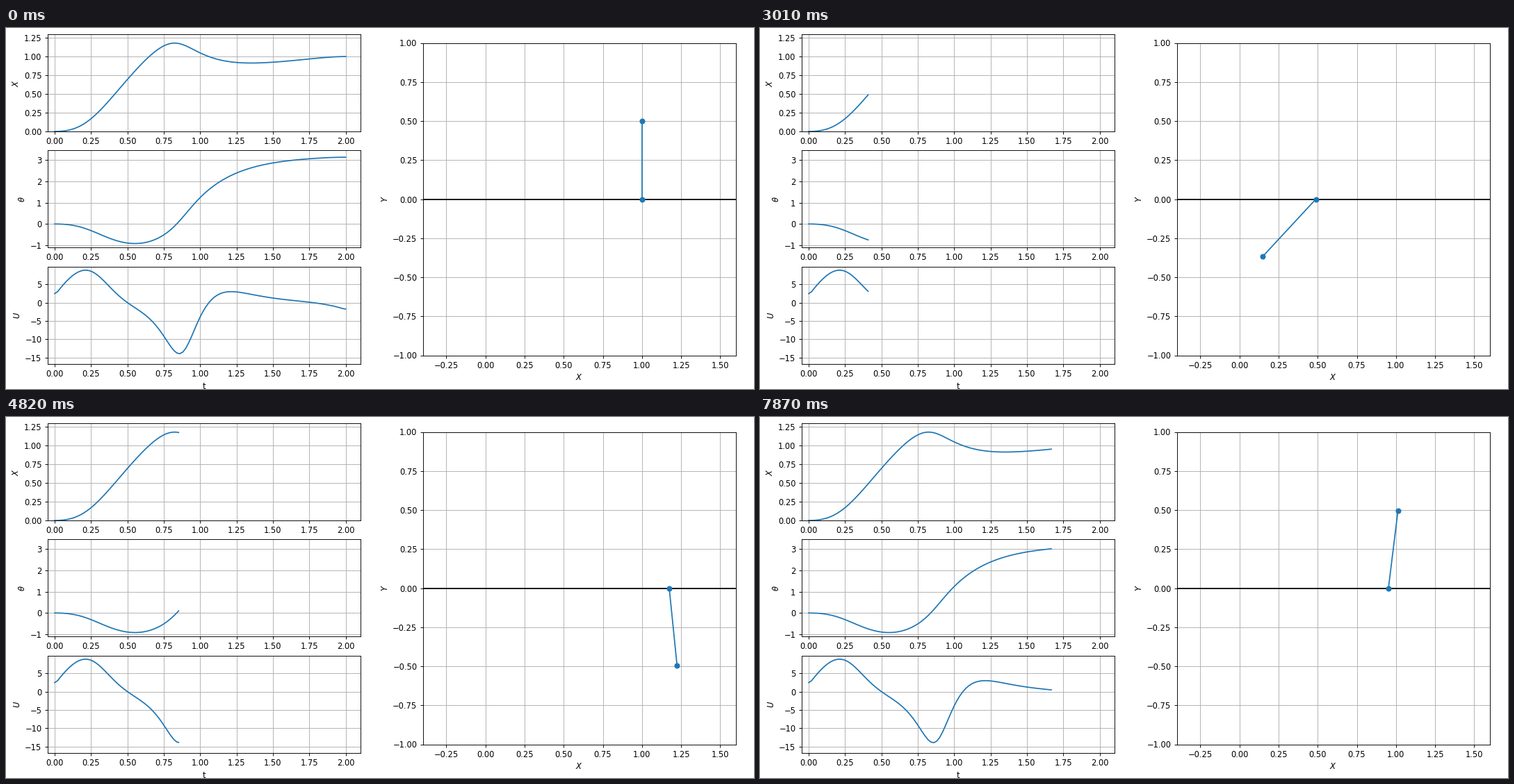
These frames come from a looping animation (1076 by 520 pixels, 7.99 s). A matplotlib script:

```python
import numpy as np
import matplotlib.pyplot as plt
from matplotlib.animation import FuncAnimation

W, H, DPI = 1076, 520, 80
FRAMES, INTERVAL = 170, 47
M1, M2, L, G = 1.0, 0.3, 0.5, 9.81   # cart, bob, rod, gravity
T, N = 2.0, 100
GOAL = np.array([1, np.pi, 0, 0])
BLUE = "#1f77b4"


def dynamics(z):
    """Rates of (x, angle, speed, spin) for rows (x, angle, speed, spin, force)."""
    _, q, v, w, u = z.T
    s, c = np.sin(q), np.cos(q)
    d = M1 + M2 * s * s
    acc = (L * M2 * s * w**2 + u + M2 * G * c * s) / d
    spin = -(L * M2 * c * s * w**2 + u * c + (M1 + M2) * G * s) / (L * d)
    return np.stack([v, w, acc, spin], axis=1)


def jacobian(z):
    jac = np.empty((len(z), 4, 5))
    for j in range(5):
        zc = z.astype(complex)
        zc[:, j] += 1e-20j
        jac[:, :, j] = dynamics(zc).imag / 1e-20
    return jac


def curvature(z, mult, eps=1e-5):
    """Second derivatives of mult . dynamics at every node."""
    hess = np.empty((len(z), 5, 5))
    for j in range(5):
        step = np.zeros(5)
        step[j] = eps
        diff = jacobian(z + step) - jacobian(z - step)
        hess[:, :, j] = np.einsum("ni,nij->nj", mult, diff) / (2 * eps)
    return (hess + hess.transpose(0, 2, 1)) / 2


def first_guess(t):
    tk = np.linspace(0, T, 17)
    x = np.array([0, .03, .17, .42, .69, .97, 1.14, 1.17, 1.05, .965,
                  .925, .915, .925, .945, .965, .99, 1])
    q = np.array([0, -.05, -.3, -.64, -.88, -.88, -.52, .28, 1.22, 1.92,
                  2.38, 2.68, 2.86, 2.99, 3.07, 3.12, 3.14])
    u = np.array([1.85, 7.4, 8.6, 4.9, .2, -3.3, -8.9, -13.7, -4.2, 1.7,
                  3, 2.2, 1.4, .8, .3, -.6, -1.85])
    rows = x, q, np.gradient(x, tk), np.gradient(q, tk), u
    return np.stack([np.interp(t, tk, r) for r in rows], axis=1)


def swing_up():
    """Least-effort swing-up by trapezoidal collocation and Newton steps."""
    t = np.linspace(0, T, N + 1)
    h = T / N
    z = first_guess(t)
    nv, nc = 5 * (N + 1), 4 * N + 8
    weight = np.full(N + 1, h)
    weight[[0, -1]] = h / 2
    eye = np.eye(4)
    lam = np.zeros(nc)

    for it in range(16):
        f, jac = dynamics(z), jacobian(z)
        s = z[:, :4]
        gaps = s[1:] - s[:-1] - h / 2 * (f[1:] + f[:-1])
        con = np.concatenate([gaps.ravel(), s[0], s[-1] - GOAL])

        a = np.zeros((nc, nv))
        for k in range(N):
            r, i = slice(4 * k, 4 * k + 4), 5 * k
            a[r, i:i + 5] = -h / 2 * jac[k]
            a[r, i + 5:i + 10] = -h / 2 * jac[k + 1]
            a[r, i:i + 4] -= eye
            a[r, i + 5:i + 9] += eye
        a[4 * N:4 * N + 4, :4] = eye
        a[4 * N + 4:, nv - 5:nv - 1] = eye

        grad = np.zeros_like(z)
        grad[:, 4] = weight * z[:, 4]

        # A few plain projections first, then the exact curvature.
        hess = np.eye(nv)
        if it > 2:
            pads = np.zeros((N + 2, 4))
            pads[1:-1] = lam[:4 * N].reshape(N, 4)
            blocks = curvature(z, -h / 2 * (pads[1:] + pads[:-1]))
            blocks[:, 4, 4] += weight
            hess[:] = 0
            for k in range(N + 1):
                hess[5 * k:5 * k + 5, 5 * k:5 * k + 5] = blocks[k]

        kkt = np.block([[hess, a.T], [a, np.zeros((nc, nc))]])
        sol = np.linalg.solve(kkt, -np.concatenate([grad.ravel(), con]))
        dz, new_lam = sol[:nv].reshape(z.shape), sol[nv:]
        size = np.abs(dz[:, 1]).max()
        rate = min(1, 0.5 / max(size, 1e-12))
        z = z + rate * dz
        lam = new_lam if it < 3 else lam + rate * (new_lam - lam)
        if it > 3 and np.abs(dz).max() < 1e-7:
            break
    return t, z[:, 0], z[:, 1], z[:, 4]


nodes, pos, ang, force = swing_up()
curves = pos, ang, force

# Moments at which the picture changes, and the simulated time it shows.
spans = [(1390, 2320, 8), (2440, 3440, 8), (3590, 4580, 8),
         (4700, 5670, 8), (5820, 6730, 7), (6880, 7870, 8)]
steps = np.concatenate([np.linspace(*s) for s in spans])
clock = ([1390, 2320, 2440, 3590, 4580, 4820, 5550, 5670, 6730, 7870],
         [0, .228, .2615, .558, .8185, .886, 1.073, 1.102, 1.369, 1.6675])

K = 1.04
plt.rcParams.update({
    "font.family": "DejaVu Sans", "font.size": 10 * K,
    "axes.labelpad": 4 * K, "axes.linewidth": 0.8 * K,
    "grid.linewidth": 0.8 * K, "grid.color": "#b0b0b0",
    "lines.linewidth": 1.5 * K, "lines.markersize": 6 * K,
    "lines.markeredgewidth": K,
})
for ax_name in ("xtick", "ytick"):
    plt.rcParams.update({f"{ax_name}.major.size": 3.5 * K,
                         f"{ax_name}.major.pad": 3.5 * K,
                         f"{ax_name}.major.width": 0.8 * K})

fig = plt.figure(figsize=(W / DPI, H / DPI), dpi=DPI, facecolor="white")


def panel(x0, y0, x1, y1, xlim, ylim, xticks, yticks, xlabel, ylabel):
    ax = fig.add_axes([x0 / W, 1 - y1 / H, (x1 - x0) / W, (y1 - y0) / H])
    ax.set_xticks(xticks)
    ax.set_yticks(yticks)
    ax.set_xlim(*xlim)
    ax.set_ylim(*ylim)
    ax.set_xlabel(xlabel)
    ax.set_ylabel(ylabel)
    ax.grid(True)
    return ax


quarters = np.arange(9) / 4
rows = [
    (9.5, 149, (0, 1.293), quarters[:6], "", "$X$"),
    (176.5, 316, (-1.1, 3.456), range(-1, 4), "", r"$\theta$"),
    (344, 484, (-16.8, 9.83), range(-15, 6, 5), "t", "$U$"),
]
traces = []
for top, bottom, ylim, yticks, xlabel, ylabel in rows:
    ax = panel(59.5, top, 509.5, bottom, (-0.05, 2.1), ylim,
               quarters, yticks, xlabel, ylabel)
    traces += ax.plot([], [], color=BLUE)

scene = panel(599.5, 21.5, 1050, 471.5, (-0.4, 1.6), (-1, 1),
              np.arange(-1, 7) / 4, np.arange(-4, 5) / 4, "$X$", "$Y$")
scene.axhline(0, color="black")
rod, = scene.plot([], [], "o-", color=BLUE)


def draw(i):
    k = np.searchsorted(steps, (i + 0.5) * INTERVAL, side="right")
    now = np.interp(steps[k - 1], *clock) if k else T
    ts = np.append(nodes[nodes < now], now)
    for line, ys in zip(traces, curves):
        line.set_data(ts, np.interp(ts, nodes, ys))
    x, q = np.interp(now, nodes, pos), np.interp(now, nodes, ang)
    rod.set_data([x, x + L * np.sin(q)], [0, -L * np.cos(q)])
    return [*traces, rod]


anim = FuncAnimation(fig, draw, frames=FRAMES, interval=INTERVAL,
                     init_func=lambda: draw(0), repeat=True, repeat_delay=0)
plt.show()
```
